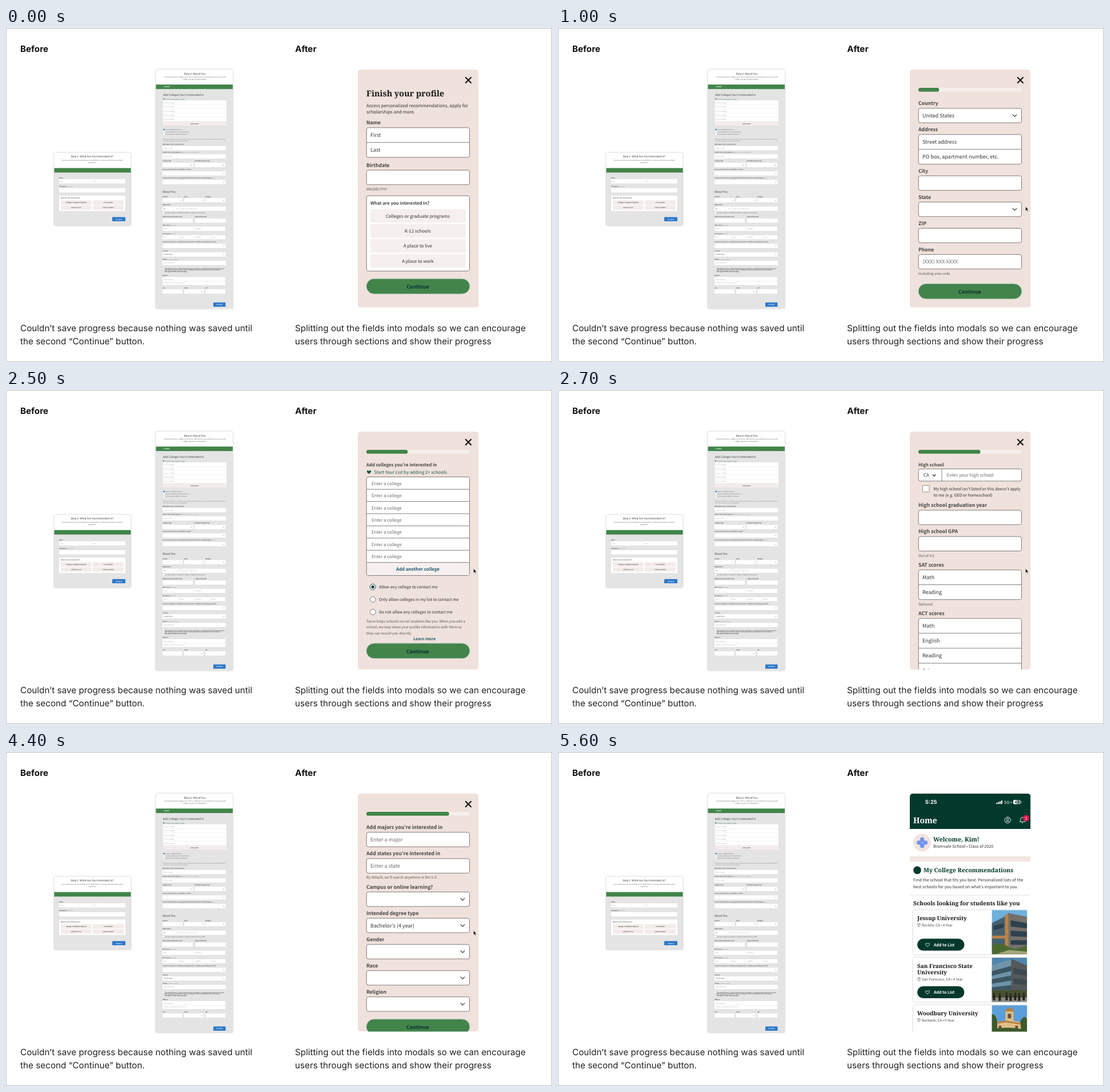
These frames come from a looping animation (956 by 586 pixels, 5700 ms). An HTML page:

```html
<!DOCTYPE html>
<html lang="en">
<head>
<meta charset="utf-8">
<style>
html, body { margin: 0; width: 100%; height: 100%; overflow: hidden; background: #fff }
svg { display: block; width: 956px; height: 586px; text-rendering: geometricPrecision;
  font-family: "Noto Sans CJK JP", "Noto Sans CJK SC", "Noto Sans CJK", "Noto Sans", sans-serif }
.inter { font-family: Inter, sans-serif }
.serif { font-family: "Noto Serif", serif; font-weight: 700 }
.b { font-weight: 700 }
.mid { text-anchor: middle }
.card { filter: drop-shadow(0 .5px 1.5px #0004) }
</style>
</head>
<body>
<svg id="stage" viewBox="0 0 956 586"></svg>
<script>
const INK = '#333', GRAY = '#6b6b6b', GREEN = '#42844a', DARK = '#02392c', TEAL = '#1f5a6d', PALE = '#f5efed', EDGE = '#77706f';

const text = (x, y, size, str, cls = '', fill = INK) =>
  `<text x="${x}" y="${y}" font-size="${size}" class="${cls}" fill="${fill}">${str}</text>`;
const rect = (x, y, w, h, fill, r = 0, stroke = 'none', sw = 1) =>
  `<rect x="${x}" y="${y}" width="${w}" height="${h}" rx="${r}" fill="${fill}" stroke="${stroke}" stroke-width="${sw}"/>`;
const circle = (x, y, r, fill, stroke = 'none', sw = 1) =>
  `<circle cx="${x}" cy="${y}" r="${r}" fill="${fill}" stroke="${stroke}" stroke-width="${sw}"/>`;
const path = (d, stroke, sw = 1, fill = 'none') =>
  `<path d="${d}" fill="${fill}" stroke="${stroke}" stroke-width="${sw}"/>`;
const chevron = (x, y, s = 3.8, sw = 1.1) => path(`M${x - s} ${y - s / 2}l${s} ${s}l${s} ${-s}`, INK, sw);
const heart = (x, y, s, fill, stroke = 'none') =>
  path(`M${x} ${y + s}C${x - 2.2 * s} ${y - s * .4} ${x - s * .8} ${y - 1.7 * s} ${x} ${y - s * .5}C${x + s * .8} ${y - 1.7 * s} ${x + 2.2 * s} ${y - s * .4} ${x} ${y + s}z`, stroke, .9, fill);
const list = (items, f) => items.map(f).join('');

// ---------- left: small static forms ----------
const tiny = (x, y, str, cls = '', fill = '#444', size = 2.6) => text(x, y, size, str, cls, fill);
const box = (x, y, w, hint = '', h = 7.4) => rect(x, y, w, h, '#fff', .6) + tiny(x + 2, y + 4.7, hint, '', '#aaa');
const pick = (x, y, w, value = '') => rect(x, y, w, 7.4, '#fff', .6) + tiny(x + 2, y + 4.7, value) + chevron(x + w - 3.5, y + 3.8, 1, .5);
const label = (x, y, str) => tiny(x, y, str, 'b', '#555', 2.5);
const vline = (x, y, h) => rect(x, y, .5, h, '#ddd');
const smallButton = (x, y, w) => rect(x, y, w, 7.4, '#2c78c8', .6) + tiny(x + w / 2, y + 4.8, 'Continue', 'mid b', '#fff');

const stepOne = () =>
  `<g class="card">${rect(84.5, 219, 134, 127.5, '#e4e4e4', 1.5)}</g>` +
  rect(84.5, 219, 134, 27, '#fff', 1.5) + rect(84.5, 245.7, 134, 7.9, GREEN) +
  text(151, 227, 4.7, 'Step 1: What Are You Interested In?', 'mid') +
  tiny(151, 232.7, 'Let us know who you are and what you’re interested in so that we can build a customized', 'mid', '#555') +
  tiny(151, 236.8, 'experience.', 'mid', '#555') +
  label(93, 263.6, 'Name') + box(93, 265.3, 116, 'First') + vline(150.5, 265.3, 7.4) + tiny(153, 270, 'Last', '', '#aaa') +
  label(93, 279, 'Birthdate') + tiny(104.5, 279, '(MM/DD/YYYY)', '', '#888', 2) + box(93, 281, 116) +
  rect(93, 294, 116, 27, '#fff', .6) + label(96, 299.2, 'What Are You Interested In?') +
  list(['Colleges / Graduate Programs', 'K-12 Schools', 'A Place to Live', 'A Place to Work'], (s, i) => {
    const x = 96 + i % 2 * 56, y = 302.3 + (i >> 1) * 8.7;
    return rect(x, y, 54, 7.7, '#f3ecea', .5) + tiny(x + 27, y + 4.8, s, 'mid b', '#444', 2.5);
  }) + smallButton(186, 331.7, 23);

const stepTwo = () =>
  `<g class="card">${rect(262.5, 73, 134.5, 419, '#e4e4e4', 1.5)}</g>` +
  rect(262.5, 73, 134.5, 27, '#fff', 1.5) + rect(262.5, 99.2, 134.5, 7.9, GREEN) +
  text(330.5, 81.7, 4.7, 'Step 2: About You', 'mid') +
  tiny(330.5, 87, 'To best find the best college for you, tell us a little about you and we’ll let you connect with', 'mid', '#555') +
  tiny(330.5, 91.2, 'colleges and get recommendations.', 'mid', '#555') +
  path('M277.3 101.8l-1.3 1.5l1.3 1.5', '#fff', .6) + tiny(279, 104.4, 'Back', 'b', '#fff', 3) +
  text(275, 118.5, 4.7, 'Add Colleges You’re Interested In') +
  heart(276.3, 124.4, 1, '#1c5b48') + tiny(279, 125.5, 'Start Your List by adding 2+ schools', '', '#1c5b48', 2.1) +
  rect(275, 127, 111, 44, '#fff', .6) + rect(275, 164, 111, 7, '#f3ecea') +
  list([0, 1, 2, 3, 4], i => tiny(276.5, 132 + i * 7.3, 'Enter a college…', '', '#aaa') + rect(275, 134.3 + i * 7.3, 111, .4, '#ddd')) +
  tiny(330.5, 168.5, 'Add Another', 'mid b', '#555', 2.4) +
  list(['Allow any college to contact me', 'Only allow colleges in my list to contact me', 'Do not allow any colleges to contact me'], (s, i) =>
    circle(276.5, 178.3 + i * 3.9, 1.3, i ? '#fff' : '#2c78c8') + tiny(279, 179.2 + i * 3.9, s, '', '#444', 2.1)) +
  tiny(275, 195.8, 'We help schools recruit students like you. When you add a school, we may share your profile information', '', '#777', 2.25) +
  tiny(275, 199, 'with them so they can recruit you directly.', '', '#777', 2.25) +
  label(274, 204.8, 'Add Majors You’re Interested In') + box(274, 207, 111, 'Enter a major…') +
  label(274, 219.4, 'States You’re Interested In') + tiny(306, 219.4, '(by default, we’ll search anywhere)', '', '#888', 2) + box(274, 221.6, 111, 'Enter a state…') +
  label(274, 234.3, 'College Type') + label(330, 234.3, 'Intended Degree Type') + pick(274, 236.6, 54) + pick(330, 236.6, 54) +
  label(274, 249.2, 'Do you intend to be recruited for a sport?') + pick(274, 251.4, 111) +
  label(274, 264.4, 'Are you interested in receiving information about ROTC scholarships?') + tiny(357, 264.4, '(Optional)', '', '#888', 2) + pick(274, 266.6, 111) +
  text(274, 289, 4.8, 'About You') +
  list([['Gender', 274], ['Race', 312], ['Religion', 349]], ([s, x]) => label(x, 296.6, s) + pick(x, 298.4, 35.5)) +
  label(274, 311.3, 'High School') + pick(274, 313.4, 30, 'PA') + box(305, 313.4, 80, 'Enter your high school') +
  rect(274.5, 322.7, 2.3, 2.3, '#fff') + tiny(278.5, 325.2, 'My high school isn’t listed or this doesn’t apply to me (e.g. GED)', '', '#555', 2.4) +
  label(274, 332, 'High School Graduation Year') + label(331, 332, 'High School GPA') + box(274, 334.2, 53) + box(331, 334.2, 54) +
  label(274, 346.8, 'SAT Scores') + tiny(288, 346.8, '(Optional)', '', '#888', 2) + box(274, 348.6, 110, 'Math') + vline(328.5, 348.6, 7.4) + tiny(331, 353.3, 'Reading', '', '#aaa') +
  label(274, 361.5, 'ACT Scores') + tiny(288, 361.5, '(Optional)', '', '#888', 2) + box(274, 363.4, 110) +
  list(['Math', 'English', 'Reading', 'Science'], (s, i) => tiny(276 + i * 27.5, 368, s, '', '#aaa') + (i ? vline(273.5 + i * 27.5, 363.4, 7.4) : '')) +
  label(274, 376.4, 'Are you a veteran or currently serving in the U.S. Military (including reserve)?') + pick(274, 378.6, 111) +
  label(274, 391.6, 'Country') + pick(274, 393.6, 111, 'United States') +
  label(274, 406.6, 'Phone') + tiny(282, 406.6, '(Including area code)', '', '#888', 2) + box(274, 408.6, 111, '(XXX) XXX-XXXX') +
  rect(274.2, 420.2, 2.3, 2.3, '#fff') +
  tiny(278, 422.6, 'By checking this box, I confirm that the number provided is my mobile number and agree to receive', 'b', '#444', 2.15) +
  tiny(278, 425.4, 'text messages and calls about schools and programs that may be right for me at this number.', 'b', '#444', 2.15) +
  tiny(278, 428.2, 'Message and data rates may apply.', 'b', '#222', 2.3) +
  label(274, 435, 'Address') + box(274, 437, 110, 'Street Address', 14) + rect(274, 443.8, 110, .5, '#ddd') + tiny(276, 448.3, 'PO box, apartment number, etc.', '', '#aaa') +
  list([['City', 274], ['State', 312], ['ZIP', 349]], ([s, x], i) => label(x, 456.6, s) + (i == 1 ? pick(x, 458.5, 34) : box(x, 458.5, 35))) +
  smallButton(363, 481.6, 21.5);

// ---------- right: the modals ----------
const head = (y, str, size = 8.7) => text(631, y, size, str, 'b', '#444');
const hint = (y, str) => text(631, y, 6.1, str, '', '#555');
const frame = (y, h) => rect(631.3, y + .4, 180.2, h, '#fff', 3, EDGE, .9);
const line = y => path(`M631.3 ${y}h180.2`, EDGE, .9);
const field = (y, value = '', fill = INK) => frame(y, 25.4) + text(638, y + 16.4, 9, value, '', fill);
const select = (y, value) => field(y, value) + chevron(799.5, y + 13);
const stack = (y, names) => frame(y, names.length * 26.3 - .6) +
  list(names, (s, i) => (i ? line(y + i * 26.3) : '') + text(638, y + 16.4 + i * 26.3, 9, s));
const button = y => rect(631.3, y, 180.4, 26, GREEN, 13, '#72a59b', .7) + text(721, y + 16.8, 8.9, 'Continue', 'mid b', '#0d2f2f');
const modal = (step, body) => rect(616, 73, 211.5, 417.5, '#efe1db') +
  path('M804.3 86.3l10.4 10.4M814.7 86.3l-10.4 10.4', '#111', 2.1) +
  (step ? rect(631, 105, 180.5, 6.8, PALE, 3.4) + rect(631, 105, 36.2 * step, 6.8, GREEN, 3.4) : '') + body;

const profile = () => modal(0,
  text(631, 120, 14.4, 'Finish your profile', 'serif', '#161616') +
  text(631, 139.3, 7.85, 'Access personalized recommendations, apply for') + text(631, 150, 7.85, 'scholarships and more.') +
  head(169, 'Name') + stack(174.5, ['First', 'Last']) +
  head(243.7, 'Birthdate') + field(249) + hint(285, 'MM/DD/YYYY') +
  rect(631.3, 294.4, 180.2, 132, '#fff', 3, EDGE, .9) + text(638, 309.8, 7.75, 'What are you interested in?', 'b', '#444') +
  list(['Colleges or graduate programs', 'K-12 schools', 'A place to live', 'A place to work'], (s, i) =>
    rect(638, 318 + i * 26.3, 167, 23.5, PALE, 2) + text(721, 332.7 + i * 26.3, 7.85, s, 'mid')) +
  button(440.2));

const address = () => modal(1,
  head(135, 'Country') + select(140.5, 'United States') +
  head(181, 'Address') + stack(186.5, ['Street address', 'PO box, apartment number, etc.']) +
  head(253.8, 'City') + field(259) + head(299.7, 'State') + select(305) +
  head(345.6, 'ZIP') + field(351) + head(391.6, 'Phone') + field(397, '(XXX) XXX-XXXX', GRAY) +
  hint(433.2, 'Including area code') + button(449));

const colleges = () => modal(2,
  head(133.8, 'Add colleges you’re interested in', 7.75) + heart(635.6, 144, 3.2, '#1c5b48') +
  text(644.5, 147, 7.8, 'Start Your List by adding 2+ schools', '', '#1c5b48') +
  rect(631.3, 152.5, 180.2, 173, '#fff', 3, EDGE, .9) + rect(632, 303, 179, 22, PALE, 2) +
  list([0, 1, 2, 3, 4, 5, 6], i => line(174.2 + i * 21.4) + text(640, 166.7 + i * 21.4, 7.75, 'Enter a college', '', GRAY)) +
  text(721, 317.3, 7.8, 'Add another college', 'mid b', TEAL) +
  list(['Allow any college to contact me', 'Only allow colleges in my list to contact me', 'Do not allow any colleges to contact me'], (s, i) =>
    circle(642.2, 345.4 + i * 22, 4.9, '#fff', i ? '#777' : '#17473f') + text(653, 348 + i * 22, 7.03, s)) +
  circle(642.2, 345.4, 2.7, '#17473f') +
  list(['Tavvo helps schools recruit students like you. When you add a', 'school, we may share your profile information with them so', 'they can recruit you directly.'], (s, i) =>
    text(631, 408 + i * 10.3, 6.05, s, '', '#555')) +
  text(732.7, 439, 6.95, 'Learn more', 'mid b', TEAL) + button(444.7));

const school = () => modal(3,
  head(133.6, 'High school', 7.75) + frame(138, 21.4) + path('M672 138.4v21.4', EDGE, .9) +
  text(640, 152.3, 7.85, 'CA') + chevron(658.7, 149.7, 2.8, 1.3) + text(680.5, 152.3, 7.9, 'Enter your high school', '', GRAY) +
  rect(638.5, 167.5, 11.5, 11.5, '#fff', 1, '#888', .9) +
  text(657.5, 175.5, 7.05, 'My high school isn’t listed or this doesn’t apply') + text(657.5, 187.2, 7.05, 'to me (e.g. GED or homeschool)') +
  head(205, 'High school graduation year') + field(210.5) +
  head(251, 'High school GPA') + field(256.7) + hint(292.6, 'Out of 4.0') +
  head(309.8, 'SAT scores') + stack(315.3, ['Math', 'Reading']) + hint(377.8, 'Optional') +
  head(394.8, 'ACT scores') + stack(400.4, ['Math', 'English', 'Reading', 'Science']));

const majors = () => modal(4,
  head(134.8, 'Add majors you’re interested in') + field(140.5, 'Enter a major', GRAY) +
  head(180.8, 'Add states you’re interested in') + field(186.7, 'Enter a state', GRAY) +
  hint(222.3, 'By default, we’ll search anywhere in the U.S.') +
  list(['Campus or online learning?', 'Intended degree type', 'Gender', 'Race', 'Religion'], (s, i) =>
    head(239.8 + i * 46, s) + select(245.2 + i * 46, i == 1 ? 'Bachelor’s (4 year)' : '')) +
  button(469));

// ---------- right: home screen ----------
const poly = (fill, d) => path(d, 'none', 0, fill);
const photos = [
  () => rect(0, 0, 62, 78, '#6fb0dc') + poly('#46606f', 'M0 23L28 9V66H0z') + poly('#75706a', 'M28 5L62 12V68H28z') +
    poly('#b9834a', 'M23 8h6v56h-6zM0 45h24v5H0z') + poly('#2c414d', 'M33 18l29 5v9l-29-3zM33 36l29 2v9l-29-1zM33 53h29v8H33zM3 28l18-5v8L3 35z') +
    poly('#4a692f', 'M0 62Q14 55 28 64T62 61V78H0z') + poly('#a4a37c', 'M6 78L30 70L62 73V78z'),
  () => rect(0, 0, 62, 78, '#4f86ad') + poly('#6e93a8', 'M0 14L36 2V60H0z') + poly('#3b5665', 'M0 24L36 14v9L0 32zM0 38l36-7v9L0 46zM0 52l36-4v9H0z') +
    poly('#54585a', 'M34 2L62 14V62H34z') + poly('#3c4a52', 'M38 18l24 5v9l-24-4zM38 36l24 3v9l-24-2z') + rect(0, 57, 62, 21, '#47512f') + rect(0, 70, 62, 8, '#8b8981') +
    list([4, 14, 26, 33, 41, 48, 56], (x, i) => circle(x, 63 + i % 2, 1.6, '#24211f') + rect(x - 2, 65 + i % 2, 4, 10, '#24211f', 1.5)),
  () => rect(0, 0, 62, 78, '#5b9fd8') + poly('#dfbd86', 'M0 31L24 27V11Q31 0 38 11V27L62 33V60H0z') + poly('#b58042', 'M23 11Q31-3 39 11zM0 31l24-4 38 6v3L24 30 0 34z') +
    poly('#69513c', 'M28 15h6v8h-6zM41 36h5v7h-5zM51 38h5v7h-5zM12 36h5v8h-5z') + poly('#3d5a2c', 'M0 16Q12 15 9 47H0zM50 28Q58 14 62 26V48H52zM0 42Q30 36 62 44V60H0z')
];
const addButton = y => rect(629, y, 82.5, 21, DARK, 10.5) + heart(647, y + 10.7, 3, 'none', '#fff') + text(658, y + 13.2, 7, 'Add to List', 'b', '#fff');
const place = (y, names, city, i) => {
  const below = y + 29 + (names.length - 1) * 11.7;
  return `<g class="card">${rect(622, y, 199, 77.5, '#fff', 3)}</g>` +
    list(names, (s, k) => text(629, y + 18 + k * 11.7, 9.85, s, 'serif', '#161616')) +
    path(`M632 ${below + .7}q-5-6 0-6.6q5 .6 0 6.6z`, '#555', .7) + circle(632, below - 3.5, .8, '#555') +
    text(637, below, 6.15, city + ' • 4 Year', '', '#444') + addButton(y + 50.3) +
    `<svg x="759.5" y="${y}" width="61.5" height="77.5" style="width:61.5px;height:77.5px">${photos[i]()}</svg>`;
};
const home = () => rect(616, 73, 211.5, 418, '#fff') + rect(616, 73, 211.5, 62, DARK) +
  text(643, 91.2, 9.3, '5:25', 'inter b', '#fff') +
  list([0, 1, 2, 3], i => rect(767.3 + i * 2.9, 89 - i * 1.3, 2, 2.3 + i * 1.3, '#fff', .5)) +
  text(781, 90.9, 7.2, '5G+', 'inter', '#fff') +
  rect(797, 84.2, 13.3, 7.2, '#91aaa3', 2.2) + rect(797, 84.2, 7, 7.2, '#fff', 2.2) + rect(811, 86.3, 1, 3, '#91aaa3', .5) +
  text(803.6, 90.2, 6.3, '43', 'inter b mid', DARK) +
  text(622, 125, 14, 'Home', 'serif', '#fff') +
  circle(787.3, 119.4, 5.2, 'none', '#fff', .9) + circle(787.3, 118, 1.9, 'none', '#fff', .9) + path('M783.8 123q3.5-3.6 7 0', '#fff', .9) +
  path('M808.5 122.4q1.5-1.3 1.5-4.4q.3-3.2 3.2-3.2t3.2 3.2q0 3.1 1.5 4.4zM812 124q1.2 1.2 2.4 0', '#fff', .9) +
  circle(819.5, 116.2, 5.6, '#e3174d') + text(819.5, 118.9, 7.5, '2', 'mid', '#fff') +
  circle(637.6, 159, 15.5, '#f0e4de') +
  list([0, 90, 180, 270], a => `<ellipse cx="637.6" cy="153.8" rx="3.7" ry="4.4" fill="#7195ee" transform="rotate(${a} 637.6 159)"/>`) +
  text(657, 157, 10.6, 'Welcome, Kim!', 'serif', DARK) + text(657, 168.3, 7.2, 'Bramvale School • Class of 2020') +
  rect(616, 183, 211.5, 9, '#f1e6e1') + circle(629, 207.4, 6.8, DARK) +
  text(640, 211.2, 10.4, 'My College Recommendations', 'serif', DARK) +
  text(622, 227.3, 7.25, 'Find the school that fits you best. Personalized lists of the') + text(622, 238.9, 7.25, 'best schools for you based on what’s important to you.') +
  rect(616, 250.8, 211.5, .8, '#ddd') + text(622, 269, 10.05, 'Schools looking for students like you', 'serif', '#161616') +
  place(277.3, ['Jessup University'], 'Rocklin, CA', 0) +
  place(360.7, ['San Francisco State', 'University'], 'San Francisco, CA', 1) +
  place(444.2, ['Woodbury University'], 'Burbank, CA', 2);

const screens = [profile, address, colleges, school, majors, home];
const stage = document.getElementById('stage');
stage.innerHTML = rect(.5, .5, 955, 585, '#fff', 0, '#c2c2c2') +
  text(25, 42, 15.2, 'Before', 'inter b', '#111') + text(506.3, 42, 15.2, 'After', 'inter b', '#111') +
  list([[25, 'Couldn’t save progress because nothing was saved until', 'the second “Continue” button.'],
    [506, 'Splitting out the fields into modals so we can encourage', 'users through sections and show their progress']], ([x, a, b]) =>
    text(x, 532.4, 15.28, a, 'inter', '#222') + text(x, 555.2, 15.28, b, 'inter', '#222')) +
  stepOne() + stepTwo() +
  `<clipPath id="panel">${rect(616, 73, 211.5, 417.5, '#000', 5)}</clipPath><g clip-path="url(#panel)">` +
  list(screens, s => `<g class="screen">${s()}</g>`) + '</g>' +
  '<path id="cursor" d="M818.6 313.6v7.2l1.7-1.5 1.3 2.8 1.2-.5-1.3-2.8h2.3z" fill="#111" stroke="#fff" stroke-width=".4"/>';

const LOOP = 5700, HOLD = 900, CURSOR_IN = 300;
const groups = stage.querySelectorAll('.screen'), cursor = document.getElementById('cursor');
const start = performance.now();
function draw(now) {
  const t = Math.max(0, now - start) % LOOP;
  const step = Math.min(5, Math.floor(t / HOLD));
  groups.forEach((g, i) => g.style.display = i == step ? '' : 'none');
  cursor.style.display = t >= CURSOR_IN && step < 5 ? '' : 'none';
  requestAnimationFrame(draw);
}
draw(start);
</script>
</body>
</html>
```
